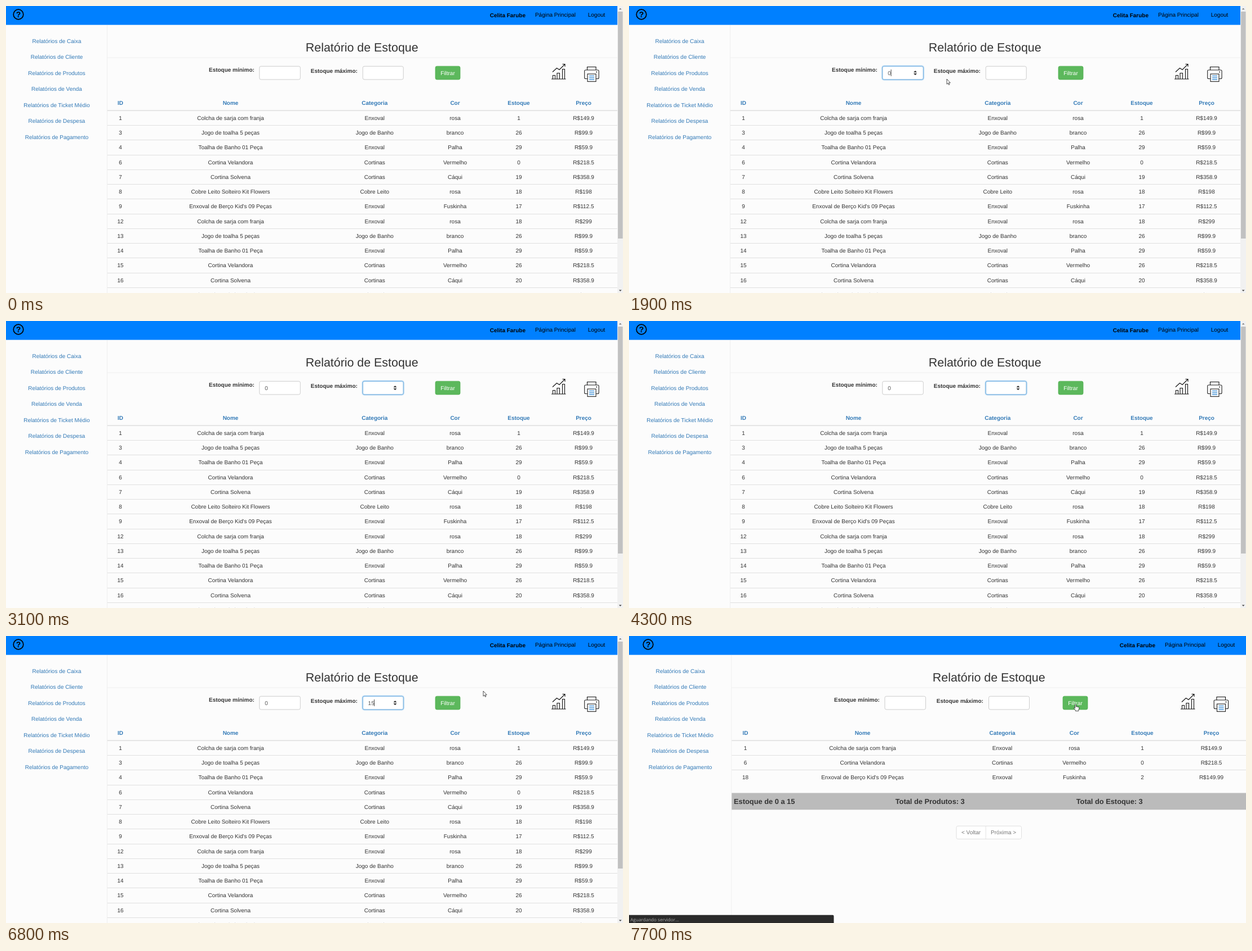
Animation of 1095 by 511 pixels, one loop 8000 ms. Source, as an HTML page:

```html
<!DOCTYPE html>
<html lang="pt-BR">
<head>
<meta charset="utf-8">
<title>Relatório de Estoque</title>
<style>
  html, body { margin: 0; width: 100%; height: 100%; overflow: hidden; background: #fcfcfc; }
  svg { display: block; width: 100vw; height: 100vh; }
  text {
    font: 9.98px "Liberation Sans", Arial, sans-serif;
    fill: #333; text-rendering: geometricPrecision; white-space: pre;
  }
  .mid { text-anchor: middle; }
  .bold { font-weight: bold; }
  .link { fill: #337ab7; }
  .black { fill: #000; }
  .white { fill: #fff; }
  .grey { fill: #777; }
  .field { fill: #555; }
  .title { font-size: 21.4px; }
  .total { font-size: 12.83px; font-weight: bold; }
  .help { font-size: 14px; font-weight: bold; fill: #000; }
  .status { font: 8.1px "Open Sans", "Noto Sans", sans-serif; fill: #aaa; }
  .ink { fill: none; stroke: #111; stroke-width: 1.1; }
</style>
</head>
<body>
<svg id="stage" viewBox="0 0 1095 511" preserveAspectRatio="none"></svg>
<script>
const NS = "http://www.w3.org/2000/svg";
const stage = document.getElementById("stage");

function el(parent, tag, attrs = {}, content) {
  const node = document.createElementNS(NS, tag);
  for (const key in attrs) node.setAttribute(key, attrs[key]);
  if (content !== undefined) node.textContent = content;
  return parent.appendChild(node);
}
const group = (parent, x = 0, y = 0) => el(parent, "g", { transform: `translate(${x} ${y})` });
const rect = (parent, x, y, width, height, fill, more) =>
  el(parent, "rect", { x, y, width, height, fill, ...more });
const path = (parent, d, more) => el(parent, "path", { d, ...more });

// y is the middle of the capitals
function label(parent, x, y, content, cls = "", size = 9.98) {
  return el(parent, "text", { x, y: y + size * 0.36, class: cls }, content);
}
const show = (node, opacity) => { node.style.opacity = Number(opacity); };

const MENU = ["Caixa", "Cliente", "Produtos", "Venda", "Ticket Médio", "Despesa", "Pagamento"];
const COLUMNS = ["ID", "Nome", "Categoria", "Cor", "Estoque", "Preço"];
const PRODUCTS = [
  ["Colcha de sarja com franja", "Enxoval", "rosa", "149.9"],
  ["Jogo de toalha 5 peças", "Jogo de Banho", "branco", "99.9"],
  ["Toalha de Banho 01 Peça", "Enxoval", "Palha", "59.9"],
  ["Cortina Velandora", "Cortinas", "Vermelho", "218.5"],
  ["Cortina Solvena", "Cortinas", "Cáqui", "358.9"],
  ["Cobre Leito Solteiro Kit Flowers", "Cobre Leito", "rosa", "198"],
  ["Enxoval de Berço Kid's 09 Peças", "Enxoval", "Fuskinha", "112.5"]
];
// id, product, stock, price when it differs
const FULL = [
  [1, 0, 1], [3, 1, 26], [4, 2, 29], [6, 3, 0], [7, 4, 19], [8, 5, 18], [9, 6, 17],
  [12, 0, 18, "299"], [13, 1, 26], [14, 2, 29], [15, 3, 26], [16, 4, 20], [17, 5, 20]
];
const FILTERED = [[1, 0, 1], [6, 3, 0], [18, 6, 2, "149.99"]];

function drawTable(page, left, right, centers, rows) {
  COLUMNS.forEach((name, i) => label(page, centers[i], 172.3, name, "mid bold link"));
  rect(page, left, 185.5, right - left, 1.3, "#dadada");
  rows.forEach(([id, product, stock, price], r) => {
    const [name, category, color, base] = PRODUCTS[product];
    const y = 199.2 + r * 26.25;
    [id, name, category, color, stock, "R$" + (price || base)]
      .forEach((cell, i) => label(page, centers[i], y, cell, "mid"));
    if (r < rows.length - 1) rect(page, left, Math.round(y + 12.8), right - left, 1, "#e0e0e0");
  });
}

function drawChartIcon(parent, x) {
  const g = group(parent, x, 0);
  path(g, "M0 130H25.5M2.5 130V123.5H6.5V130M10 130V119.5H14.5V130M19.5 130V112.5H23.5V130" +
    "M2 117.5L9.5 110.5L14 113.5L23.5 104M19.5 103.5H24V108", { class: "ink" });
}

function drawPrinter(parent, x) {
  const g = group(parent, x, 0);
  path(g, "M5.5 114V108.5H21V114", { class: "ink" });
  rect(g, 0.7, 114, 25.4, 15.5, "#fcfcfc", { rx: 2, stroke: "#222", "stroke-width": 1.1 });
  rect(g, 6, 121, 15, 13.5, "#fcfcfc", { stroke: "#222", "stroke-width": 1.1 });
  path(g, "M9 124.5H18M9 127.8H18M9 131H18", { stroke: "#4a98dc", "stroke-width": 1.5 });
  el(g, "circle", { cx: 22, cy: 117.5, r: 1, fill: "#222" });
}

const inputBox = (parent, x, width) =>
  rect(parent, x, 107.3, width, 23.6, "#fff", { rx: 2.8, stroke: "#c8c8c8", "stroke-width": 0.9 });

function drawPage(o) {
  const page = group(stage);
  rect(page, 0, 0, 1095, 511, "#fcfcfc");
  rect(page, 0, 0, o.right, 33.6, "#0080ff");
  el(page, "circle", { cx: 22 + o.bar, cy: 15, r: 8.8, fill: "none", stroke: "#000", "stroke-width": 1.7 });
  label(page, 22 + o.bar, 15, "?", "mid help", 14);
  label(page, 890.4 + o.bar, 16.2, "Celita Farube", "mid bold black");
  label(page, 975 + o.bar, 15.2, "Página Principal", "mid black");
  label(page, 1048 + o.bar, 15.2, "Logout", "mid black");

  MENU.forEach((name, i) => label(page, o.menu, 62.2 + i * 28.52, "Relatórios de " + name, "mid link"));
  rect(page, o.left - 0.8, 34, 0.8, 477, "#ebebeb");
  rect(page, o.left, 91.6, o.right - o.left, 0.8, "#ebebeb");
  label(page, o.title, 73.6, "Relatório de Estoque", "mid title", 21.4);

  label(page, o.minLabel, 113.7, "Estoque mínimo:", "bold");
  label(page, o.maxLabel, 115.2, "Estoque máximo:", "bold");
  inputBox(page, o.min, 72.5);
  inputBox(page, o.max, 72);
  const button = rect(page, o.button, 107.2, 44, 23.8, "#5cb85c",
    { rx: 2.8, stroke: "#4cae4c", "stroke-width": 0.7 });
  label(page, o.button + 22, 119, "Filtrar", "mid white");
  drawChartIcon(page, o.chart);
  drawPrinter(page, o.printer);
  drawTable(page, o.left, o.right, o.centers, o.rows);
  return { page, button };
}

function drawFocus(parent, x, width) {
  const g = group(parent);
  const ring = (grow, opacity) => rect(g, x - grow, 107.3 - grow, width + 2 * grow, 23.6 + 2 * grow, "none",
    { rx: 2.8 + grow, stroke: "#66afe9", "stroke-width": 1, "stroke-opacity": opacity });
  ring(0, 1);
  ring(0.9, 0.45);
  ring(1.8, 0.15);
  return g;
}

const drawSpinner = (parent, x) =>
  path(parent, `M${x - 3} 118.2L${x} 115L${x + 3} 118.2ZM${x - 3} 120L${x} 123.2L${x + 3} 120Z`, { fill: "#333" });

function drawStatus(width, content) {
  const g = group(stage);
  path(g, `M0 496.8H${width - 2}Q${width} 496.8 ${width} 499V511H0Z`, { fill: "#2b2b2b" });
  label(g, 2.5, 504.6, content, "status", 8.1);
  return g;
}

const list = drawPage({
  right: 1085, left: 180, bar: 0, menu: 90, title: 631.7,
  minLabel: 360, maxLabel: 540.8, min: 449.8, max: 633.2, button: 762,
  chart: 968, printer: 1026, rows: FULL,
  centers: [203, 398.5, 654.3, 797, 910, 1025]
});
rect(list.page, 1085, 0, 10, 511, "#f1f1f1");
rect(list.page, 1086, 10, 8.5, 404, "#c1c1c1");
path(list.page, "M1087.8 6.3L1090.2 3.7L1092.6 6.3Z", { fill: "#777" });
path(list.page, "M1087.8 505.5L1090.2 508.1L1092.6 505.5Z", { fill: "#444" });

const minFocus = drawFocus(list.page, 449.8, 72.5);
const maxFocus = drawFocus(list.page, 633.2, 72);
const minSpin = drawSpinner(list.page, 508);
const maxSpin = drawSpinner(list.page, 690.5);
const minText = label(list.page, 459.2, 119, "", "field");
const maxText = label(list.page, 642.6, 119, "", "field");
const caret = rect(list.page, 0, 113, 0.8, 12, "#222");
const buttonRing = rect(list.page, 761.7, 106.8, 44.6, 24.6, "none",
  { rx: 2, stroke: "#6aa2d8", "stroke-width": 1.2 });

const result = drawPage({
  right: 1095, left: 182.3, bar: 12, menu: 91, title: 638.7,
  minLabel: 364, maxLabel: 545.8, min: 454, max: 638.5, button: 770,
  chart: 979, printer: 1037.5, rows: FILTERED,
  centers: [206.5, 414.5, 662.6, 790.3, 911, 1033.5]
});
rect(result.page, 182.3, 279.5, 912.7, 29.8, "#bbb");
[[186, "Estoque de 0 a 15"], [472.7, "Total de Produtos: 3"], [793.7, "Total do Estoque: 3"]]
  .forEach(([x, content]) => label(result.page, x, 294.6, content, "total", 12.83));
rect(result.page, 581, 338.3, 115.5, 23.2, "#fff", { rx: 3, stroke: "#ddd", "stroke-width": 0.9 });
rect(result.page, 632.8, 338.3, 0.8, 23.2, "#ddd");
label(result.page, 607, 349.4, "< Voltar", "mid grey");
label(result.page, 664.6, 349.4, "Próxima >", "mid grey");

const linkStatus = drawStatus(174, "servidor/exemplo/consultas/tabelaProdutos/");
const waitStatus = drawStatus(363.5, "Aguardando servidor...");

const outline = { fill: "#fff", stroke: "#222", "stroke-width": 0.8, "stroke-linejoin": "round" };
const arrow = path(stage, "M0 0V9.2L2.1 7.3L3.5 10.4L4.9 9.8L3.5 6.8H6.3Z", outline);
const hand = path(stage,
  "M-0.9 0.9Q0 -0.3 0.9 0.9V4.4L2.5 4.6L4.2 5L5.8 5.6Q6.6 6 6.4 7.4L5.4 10.2V12.2H-0.2V10.8" +
  "L-3 7.4Q-3.3 6.2 -2.2 6.2L-0.9 7.4Z", outline);

// Value of the last step whose time has come
function at(t, steps) {
  let value = steps[0][1];
  for (const [time, next] of steps) if (t >= time) value = next;
  return value;
}

// Pointer runs: start time, then one place every 100 ms
const RUNS = [
  [200, [[662, 52], [640, 76], [599, 106], [548, 127], [509, 132], [486, 129]]],
  [1900, [[564, 130], [598, 150], [636, 166], [656, 147]]],
  [6200, [[650, 136], [560, 230], [455, 400], [406, 477], [560, 430], [770, 260], [847, 98]]]
];
function pointerAt(t) {
  for (const [start, places] of RUNS) {
    const place = places[(t - start) / 100];
    if (place) return place;
  }
  return null;
}

const LINK_STATUS = [[0, 0], [200, 1], [700, 0.66], [800, 0.35], [900, 0.12], [1000, 0],
  [2000, 0.3], [2100, 0.66], [2200, 0.35], [2300, 0]];
const WAIT_STATUS = [[0, 0], [7300, 0.7], [7400, 1]];
const MIN_FOCUS = [[0, 0], [1100, 1], [2600, 0.6], [2700, 0.15], [2800, 0]];
const MAX_FOCUS = [[0, 0], [2600, 0.4], [2700, 0.85], [2800, 1], [7000, 0]];
const MAX_TEXT = [[0, ""], [5600, "1"], [5700, "15"]];
// Caret position, 0 while it is off
const CARET = [[0, 0], [1100, 459], [1400, 0], [1700, 464.7], [2200, 0],
  [2600, 642.3], [3100, 0], [3800, 642.3], [4300, 0], [4800, 642.3], [5300, 0],
  [5600, 647.8], [5700, 653.2], [6200, 0], [6700, 653.2], [7000, 0]];

function draw(ms) {
  const t = Math.floor(ms / 100) * 100;
  const between = (a, b) => t >= a && t < b;

  show(list.page, t < 7700);
  show(result.page, t >= 7700);
  show(linkStatus, at(t, LINK_STATUS));
  show(waitStatus, at(t, WAIT_STATUS));
  show(minFocus, at(t, MIN_FOCUS));
  show(maxFocus, at(t, MAX_FOCUS));
  show(minSpin, between(800, 2600));
  show(maxSpin, between(2300, 7000));
  minText.textContent = t >= 1700 ? "0" : "";
  maxText.textContent = at(t, MAX_TEXT);

  const x = at(t, CARET);
  caret.setAttribute("x", x);
  show(caret, x > 0);

  list.button.setAttribute("fill", t >= 6900 ? "#449d44" : "#5cb85c");
  show(buttonRing, t >= 7000);

  const place = pointerAt(t);
  show(arrow, place !== null);
  if (place) arrow.setAttribute("transform", `translate(${place})`);
  show(hand, t >= 6900);
  hand.setAttribute("transform", t < 7000 ? "translate(794 118)" : "translate(792.5 121.3)");
}

const began = performance.now();
function tick() {
  draw((performance.now() - began) % 8000);
  requestAnimationFrame(tick);
}
tick();
</script>
</body>
</html>
```
